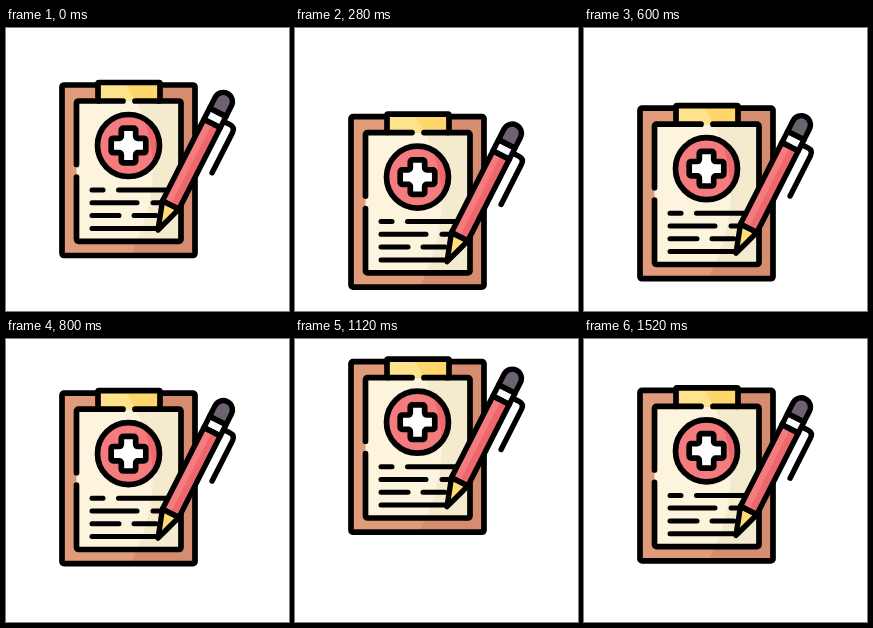
Recreate the animation shown at these times as an HTML page with a canvas. Size 283 by 283 pixels, loop 1560 ms.

```html
<!DOCTYPE html>
<html lang="en">
<head>
<meta charset="utf-8">
<title>Floating clipboard</title>
<style>
  html, body { margin: 0; width: 100%; height: 100%; overflow: hidden; background: #fff; }
  canvas { display: block; width: 100vw; height: 100vh; }
</style>
</head>
<body>
<canvas id="stage"></canvas>
<script>
const SIZE = 283, LOOP = 1560, STEP = 40, LIFT = 35;
const canvas = document.getElementById('stage');
const ctx = canvas.getContext('2d');

// Open path with its inner corners rounded
function polyline(points, radius = 0) {
  const path = new Path2D();
  path.moveTo(...points[0]);
  for (let i = 1; i < points.length - 1; i++) {
    path.arcTo(...points[i], ...points[i + 1], radius);
  }
  path.lineTo(...points[points.length - 1]);
  return path;
}

// Closed path, started halfway along its last side
function polygon(points, radius = 0) {
  const [a, b] = [points[0], points[points.length - 1]];
  const middle = [(a[0] + b[0]) / 2, (a[1] + b[1]) / 2];
  const path = polyline([middle, ...points, middle], radius);
  path.closePath();
  return path;
}

function box(x1, y1, x2, y2, radius) {
  return polygon([[x1, y1], [x2, y1], [x2, y2], [x1, y2]], radius);
}

function line(points, radius) {
  ctx.stroke(polyline(points, radius));
}

// Right-hand region that lies in a slightly deeper tone
const shade = new Path2D('M115 50 Q175 130 122 232 H200 V50 Z');

function fill(path, light, deep) {
  ctx.fillStyle = light;
  ctx.fill(path);
  if (!deep) return;
  ctx.save();
  ctx.clip(path);
  ctx.fillStyle = deep;
  ctx.fill(shade);
  ctx.restore();
}

function drawBoard() {
  const board = box(56, 57, 189, 227.5, 2);
  fill(board, '#e09b7b', '#d68c6e');
  ctx.stroke(board);

  fill(box(70.5, 73, 175, 213.3, 2), '#fcf4dc', '#f4eacd');
  line([[92, 73], [70.5, 73], [70.5, 136.5]], 2);
  line([[70.5, 149], [70.5, 213.3], [175, 213.3], [175, 73], [153, 73]], 2);

  fill(box(92, 54.5, 154, 73, 1), '#ffe38c', '#ffd66c');
  line([[117, 73], [92, 73], [92, 54.5], [154, 54.5], [154, 73], [129, 73]], 1);
}

function drawBadge() {
  const cx = 122.5, cy = 117.5, arm = 17.3, half = 7.2;
  const disc = new Path2D();
  disc.arc(cx, cy, 31, 0, 2 * Math.PI);
  fill(disc, '#f47c7e', '#ee686b');
  ctx.stroke(disc);

  const corners = [];
  for (let i = 0; i < 4; i++) {
    const c = Math.round(Math.cos(i * Math.PI / 2));
    const s = Math.round(Math.sin(i * Math.PI / 2));
    for (const [x, y] of [[half, -half], [arm, -half], [arm, half]]) {
      corners.push([cx + x * c - y * s, cy + x * s + y * c]);
    }
  }
  const cross = polygon(corners, 2);
  fill(cross, '#ffffff', '#f4f2f8');
  ctx.stroke(cross);
}

function drawText() {
  const rows = [
    [162, 86, 97, 112.5, 165],
    [174.7, 86, 131, 147, 160],
    [187.5, 86, 113, 128, 150],
    [200.4, 86, 151]
  ];
  ctx.lineWidth = 5;
  for (const [y, ...ends] of rows) {
    for (let i = 0; i < ends.length; i += 2) line([[ends[i], y], [ends[i + 1], y]]);
  }
}

// Local axes: origin at the nib, y runs up the barrel as negative values
function drawPen() {
  const r = 9.2, neck = -28, bandLow = -119.5, bandHigh = -132, capTop = -144;
  ctx.save();
  ctx.translate(152, 202);
  ctx.rotate(Math.atan2(65.3, 128.5));
  ctx.lineWidth = 5.4;

  ctx.stroke(new Path2D('M9 -126.5 H16.5 Q22.3 -126.5 22.3 -120.5 V-75.5'));

  const nib = polygon([[0, 0], [-r, neck], [r, neck]]);
  const barrel = box(-r, neck, r, bandLow);
  const band = box(-r, bandLow, r, bandHigh);
  const cap = new Path2D();
  cap.moveTo(-r, bandHigh);
  cap.lineTo(-r, capTop);
  cap.arc(0, capTop, r, Math.PI, 2 * Math.PI);
  cap.lineTo(r, bandHigh);
  cap.closePath();

  fill(nib, '#ffdc78');
  fill(barrel, '#f47c7e');
  fill(box(0, neck, r, bandLow), '#ee686b');
  fill(band, '#fbfafd');
  fill(cap, '#6c6270');
  for (const part of [nib, barrel, band, cap]) ctx.stroke(part);
  ctx.restore();
}

function frame(now) {
  const width = Math.round(innerWidth * devicePixelRatio);
  const height = Math.round(innerHeight * devicePixelRatio);
  if (canvas.width !== width || canvas.height !== height) {
    canvas.width = width;
    canvas.height = height;
  }
  const time = Math.floor((now % LOOP) / STEP) * STEP;
  const drift = LIFT * Math.sin(2 * Math.PI * time / LOOP);

  ctx.setTransform(width / SIZE, 0, 0, height / SIZE, 0, 0);
  ctx.fillStyle = '#fff';
  ctx.fillRect(0, 0, SIZE, SIZE);
  ctx.translate(0, drift);
  ctx.strokeStyle = '#000';
  ctx.lineWidth = 5.7;
  ctx.lineCap = ctx.lineJoin = 'round';

  drawBoard();
  drawBadge();
  drawText();
  drawPen();
}

const start = performance.now();
function tick() {
  frame(performance.now() - start);
  requestAnimationFrame(tick);
}
tick();
</script>
</body>
</html>
```
